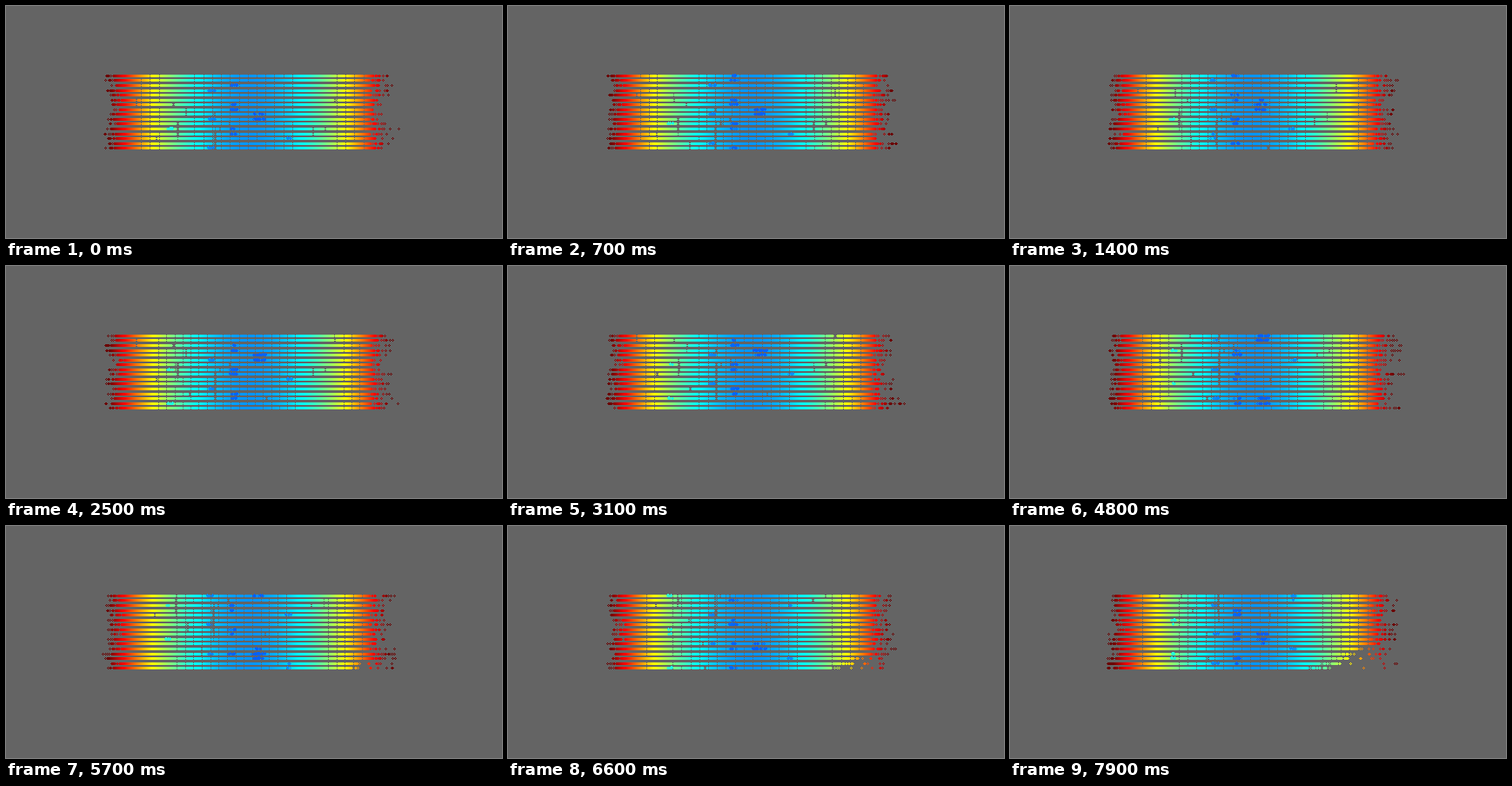
These frames come from a looping animation (570 px wide and 267 px high, 8 s). A matplotlib script:

```python
import numpy as np
import matplotlib.pyplot as plt
from matplotlib.animation import FuncAnimation

W, H = 570, 267
FRAMES, STEP = 80, 100
GREY = 100
ROWS = np.round(79.85 + 5.56 * np.arange(16)).astype(int)
MID = 279
X = np.arange(108, 465)
RISE = 9.0  # upward speed of the scene, pixels per second
HELD = {15, 18, 47, 50, 68, 70, 73, 75}

# lanes of near objects: x, first y, spacing, size
LANES = [(188, 141, 40, 3.5), (236, 97, 33, 4), (261, 90, 27, 5),
         (291, 127, 72, 8), (326, 153, 59, 3.5)]
BLOBS = [(x, y, size, 0.9 * size)
         for x, first, gap, size in LANES for y in range(first, 232, gap)]

# two thin shadows and some scattered holes without returns
layout = np.random.default_rng(8)
HOLES = [(197, 143, 1.5, 12), (240, 160, 1.5, 23)]
HOLES += [(layout.uniform(145, 400), layout.uniform(85, 225), 1.2, 4) for _ in range(14)]


def jet(v):
    """Blue for near, dark red for far."""
    rgb = 1.5 - np.abs(4 * v[:, None] - np.array([3, 2, 1]))
    return 255 * np.clip(rgb, 0, 1)


def depth_at(x):
    return np.minimum(0.272 + 2.9e-5 * (x - MID) ** 2, 1.02)


def inside(x, y, shape, sway, t):
    cx, cy, rx, ry = shape
    return ((x - cx - sway) / rx) ** 2 + ((y - cy + RISE * t) / ry) ** 2 <= 1


def rings(img, x, y, col):
    for dx, dy in ((0, -1), (0, 1), (-1, 0), (1, 0)):
        img[y + dy, x + dx] = col


def tick_columns(rng):
    """Columns skipped by the sweep, apart from two smooth stretches."""
    ticks = np.arange(150 + rng.uniform(0, 9), 412, rng.uniform(9.2, 10.4))
    for lo, hi in ((150, 230), (310, 390)):
        a = rng.uniform(lo, hi - 30)
        ticks = ticks[(ticks < a) | (ticks > a + rng.uniform(20, 45))]
    return np.round(ticks).astype(int)


def row_points(rng, r, y, t, ticks, sway):
    start = 115 + 5 * np.exp(-((r - 6) / 2) ** 2) + rng.normal(0, 2.5)
    end = 441 - 6 * np.exp(-((r - 6) / 2) ** 2) + rng.normal(0, 6)
    core = 416 + rng.uniform(-2, 5)
    chance = np.interp(X, [start, start + 7, start + 14, core, core + 9, end],
                       [0.4, 0.65, 1, 1, 0.4, 0.2], left=0, right=0)
    if rng.random() < 0.1:
        chance[min(int(end) + 8, 459) - X[0]] = 1

    # the cut-off corner climbs from the lower right, leaving clumps behind
    cut = y - (207 - RISE * t)
    if cut > 0:
        edge = 414 - 1.7 * cut + rng.normal(0, 2)
        clumps = np.where(np.sin(X / 2 + y) > 0.9, 0.6, 0.03)
        beyond = (X > edge) & (X < 424)
        chance[beyond] = clumps[beyond]
        chance[X >= 424] *= 0.6
        chance[(X > edge - cut) & (X <= edge)] *= 0.65

    skipped = np.isin(X, ticks) & (rng.random(X.size) < 0.9)
    keep = (rng.random(X.size) < chance) & ~skipped
    for hole in HOLES:
        keep &= ~inside(X, y, hole, sway, t)
    return X[keep]


def scene(f):
    while f in HELD:
        f -= 1
    t = f * STEP / 1000
    rng = np.random.default_rng(500 + f)
    sway = 1.5 * np.cos(2 * np.pi * t / 2.5) - 1.5
    img = np.full((H, W, 3), GREY, np.uint8)
    ticks = tick_columns(rng)
    for r, y in enumerate(ROWS):
        x = row_points(rng, r, y, t, ticks, sway)
        v = depth_at(x - sway / 2)
        rings(img, x, y, jet(v))
        for blob in BLOBS:
            near = inside(x, y, blob, sway, t) & (rng.random(x.size) < 0.8)
            rings(img, x[near], y, jet(0.8 * v[near]))
            lifted = near & (rng.random(x.size) < 0.4)
            rings(img, x[lifted], y - 1, jet(0.8 * v[lifted]))
    return img


fig = plt.figure(figsize=(W / 100, H / 100), dpi=100, facecolor="#646464")
ax = fig.add_axes([0, 0, 1, 1])
ax.axis("off")
view = ax.imshow(scene(0), interpolation="nearest", aspect="auto")


def update(f):
    view.set_data(scene(f))
    return [view]


anim = FuncAnimation(fig, update, frames=FRAMES, interval=STEP, repeat=True, repeat_delay=0)
plt.show()
```
